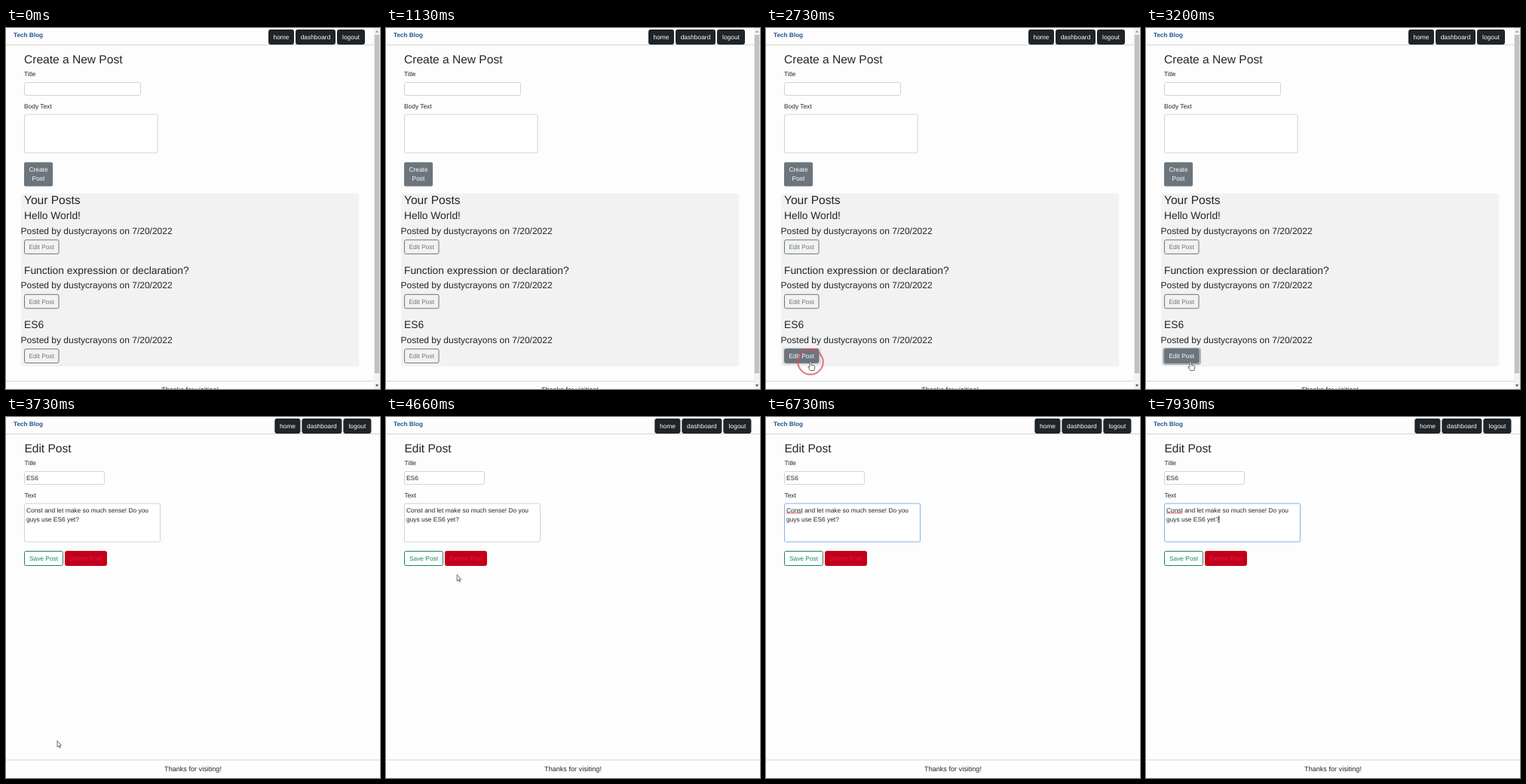
These frames come from a looping animation (496 by 480 pixels, 8000 ms). An HTML page:

```html
<!DOCTYPE html>
<html lang="en">
<head>
<meta charset="utf-8">
<title>Tech Blog</title>
<style>
  html, body { margin: 0; width: 100%; height: 100%; overflow: hidden; background: #fdfdfd; }
  svg { display: block; width: 496px; height: 480px; }
  text {
    font-family: "Liberation Sans", Arial, sans-serif;
    font-size: 8.4px; fill: #212529; text-rendering: geometricPrecision;
  }
  .h2 { font-size: 15.55px; }
  .h3 { font-size: 13.8px; }
  .h4 { font-size: 12.02px; }
  .foot { font-size: 9.1px; }
  .brand { font-size: 8.2px; font-weight: bold; fill: #1f5391; }
  .mid { text-anchor: middle; }
</style>
</head>
<body>
<svg id="stage" viewBox="0 0 496 480"></svg>
<script>
const LOOP = 8000;
const OPEN_EDIT = 3330;
const FOCUS = 5800;
const BLINK = 532;
const GREY = '#6c757d', FIELD = '#ced4da', DARK = '#1e2428';
const stage = document.getElementById('stage');

function add(parent, tag, attrs, content) {
  const el = document.createElementNS('http://www.w3.org/2000/svg', tag);
  for (const key in attrs) el.setAttribute(key, attrs[key]);
  if (content) el.textContent = content;
  parent.appendChild(el);
  return el;
}
const group = parent => add(parent, 'g', {});
const text = (p, x, y, str, cls = '', extra = {}) =>
  add(p, 'text', { x, y, class: cls, ...extra }, str);
const box = (p, x, y, width, height, extra) =>
  add(p, 'rect', { x, y, width, height, ...extra });
const field = (p, x, y, w, h) =>
  box(p, x, y, w, h, { rx: 2, fill: '#fff', stroke: FIELD });
const rule = (p, y, w) => box(p, 0, y, w, 1, { fill: '#d3d4d5' });

function button(p, x, y, w, h, label, fill, stroke, color) {
  const rect = box(p, x, y, w, h, { rx: 2, fill, stroke });
  const caption = text(p, x + w / 2, y + h / 2 + 3, label, 'mid');
  caption.style.fill = color;
  return { rect, caption };
}

function header(p, dx, width) {
  text(p, 10, 12, 'Tech Blog', 'brand');
  rule(p, 22, width);
  [[348.5, 33, 'home'], [384.5, 52, 'dashboard'], [439.5, 36, 'logout']].forEach(
    ([x, w, label]) => button(p, x + dx, 2.5, w, 19, label, DARK, DARK, '#fff'));
}

function dashboard() {
  const p = group(stage);
  header(p, 0, 488);
  text(p, 24, 46.8, 'Create a New Post', 'h2');
  text(p, 24, 64.4, 'Title');
  field(p, 24.5, 72.5, 154, 17);
  text(p, 24, 106.8, 'Body Text');
  field(p, 24.5, 115, 176.5, 51);
  box(p, 24, 178.5, 38, 32, { rx: 2, fill: GREY });
  ['Create', 'Post'].forEach((word, i) =>
    text(p, 43, 190.9 + i * 12.4, word, 'mid').style.fill = '#fff');

  box(p, 20, 220, 448, 230, { fill: '#f2f2f2' });
  text(p, 24, 234.4, 'Your Posts', 'h2');
  const halo = box(p, 22, 425, 51, 23, { rx: 4, fill: GREY, opacity: 0 });
  let edit;
  ['Hello World!', 'Function expression or declaration?', 'ES6'].forEach((title, i) => {
    const y = i * 72.5;
    text(p, 24, 254.4 + y, title, 'h3');
    text(p, 19.6, 273.6 + y, 'Posted by dustycrayons on 7/20/2022', 'h4');
    edit = button(p, 24.5, 281.8 + y, 45.5, 18.5, 'Edit Post', '#f2f2f2', GREY, GREY);
  });
  rule(p, 469, 488);
  text(p, 244, 484.3, 'Thanks for visiting!', 'foot mid');

  box(p, 488, 0, 8, 480, { fill: '#f1f1f1' });
  box(p, 488.8, 9, 6.4, 450, { fill: '#c1c1c1' });
  add(p, 'path', { d: 'M490 6l2-3 2 3z', fill: '#9a9a9a' });
  add(p, 'path', { d: 'M490 474l2 3 2-3z', fill: '#505050' });
  return { p, edit, halo };
}

function editor() {
  const p = group(stage);
  header(p, 8.4, 496);
  text(p, 24.4, 47, 'Edit Post', 'h2');
  text(p, 24.5, 64.4, 'Title');
  field(p, 24.5, 72.5, 106, 17);
  text(p, 27, 83.8, 'ES6');
  text(p, 24.5, 106.8, 'Text');
  const area = field(p, 24.5, 115, 180, 51);
  text(p, 27, 126.6, 'Const and let make so much sense! Do you');
  text(p, 27, 138.9, 'guys use ES6 yet?');
  const squiggle = add(p, 'path', {
    d: 'M27 127.9' + 'q.75 -.8 1.5 0t1.5 0'.repeat(7),
    fill: 'none', stroke: '#d3303c', 'stroke-width': 0.9
  });
  const caret = box(p, 96.4, 131.5, 0.9, 9.5, { fill: '#111' });
  button(p, 24.5, 178.5, 51, 19, 'Save Post', '#fff', '#198754', '#198754');
  button(p, 78.5, 178.5, 55, 19, 'Delete Post', '#c3001c', '#c3001c', '#dc2038');
  rule(p, 455.5, 496);
  text(p, 248, 471.2, 'Thanks for visiting!', 'foot mid');
  return { p, area, squiggle, caret };
}

const dash = dashboard();
const edit = editor();

const ring = add(stage, 'circle', {
  r: 16.7, fill: 'none', stroke: '#d94a55', 'stroke-width': 2.2
});
const pointer = { fill: '#fff', stroke: '#444', 'stroke-width': 0.8, 'stroke-linejoin': 'round' };
const hand = add(stage, 'path', {
  d: 'M-1 0.6Q0 -.8 1 .6V4.6L5 5.6Q6 6 5.8 7.5L4.8 12H-.2L-3 8Q-3.4 6.6-2 6.8L-1 7.6Z', ...pointer
});
const arrow = add(stage, 'path', {
  d: 'M0 0V8.4L1.9 6.7 3.1 9.4 4.3 8.9 3.1 6.2H5.4Z', ...pointer
});

// Pointer stops: time, x, y
const path = [
  [2200, 66, 444], [2260, 64.5, 443], [2640, 59, 443.5], [3400, 59, 443.5],
  [3730, 68, 430.5], [4130, 72, 424], [4400, 84, 322], [4860, 101, 135]
];
const clicks = [[2680, 59, 444], [FOCUS, 101, 134.6]];

const clamp = v => Math.max(0, Math.min(1, v));
const ease = v => v * v * (3 - 2 * v);
const show = (el, on) => { el.style.display = on ? '' : 'none'; };

function pointerAt(t) {
  const i = path.findIndex(stop => stop[0] > t);
  if (i < 1) return null;
  const [a, b] = [path[i - 1], path[i]];
  const k = ease((t - a[0]) / (b[0] - a[0]));
  return [a[1] + (b[1] - a[1]) * k, a[2] + (b[2] - a[2]) * k];
}

function mix(a, b, k) {
  return 'rgb(' + a.map((v, i) => Math.round(v + (b[i] - v) * k)).join(',') + ')';
}

function draw(t) {
  const editing = t >= OPEN_EDIT;
  show(dash.p, !editing);
  show(edit.p, editing);

  const hover = ease(clamp((t - 2260) / 150));
  dash.edit.rect.setAttribute('fill', mix([242, 242, 242], [108, 117, 125], hover));
  dash.edit.caption.style.fill = mix([108, 117, 125], [255, 255, 255], hover);
  dash.halo.setAttribute('opacity', 0.5 * clamp((t - clicks[0][0]) / 150));

  const focused = t >= FOCUS;
  edit.area.setAttribute('stroke', focused ? '#86b0ea' : FIELD);
  show(edit.caret, focused && Math.floor((t - FOCUS) / BLINK) % 2 === 0);
  show(edit.squiggle, t >= 6060);

  const at = pointerAt(t);
  const shape = editing ? arrow : hand;
  for (const el of [hand, arrow]) show(el, at && el === shape && at[1] > 166);
  if (at) shape.setAttribute('transform', `translate(${at[0]} ${at[1]})`);

  const click = clicks.find(c => t >= c[0] && t < c[0] + 420);
  show(ring, click);
  if (click) {
    ring.setAttribute('cx', click[1]);
    ring.setAttribute('cy', click[2]);
    ring.setAttribute('opacity', 0.8 * (1 - (t - click[0]) / 420));
  }
}

const start = performance.now();
function tick() {
  draw((performance.now() - start) % LOOP);
  requestAnimationFrame(tick);
}
tick();
</script>
</body>
</html>
```
